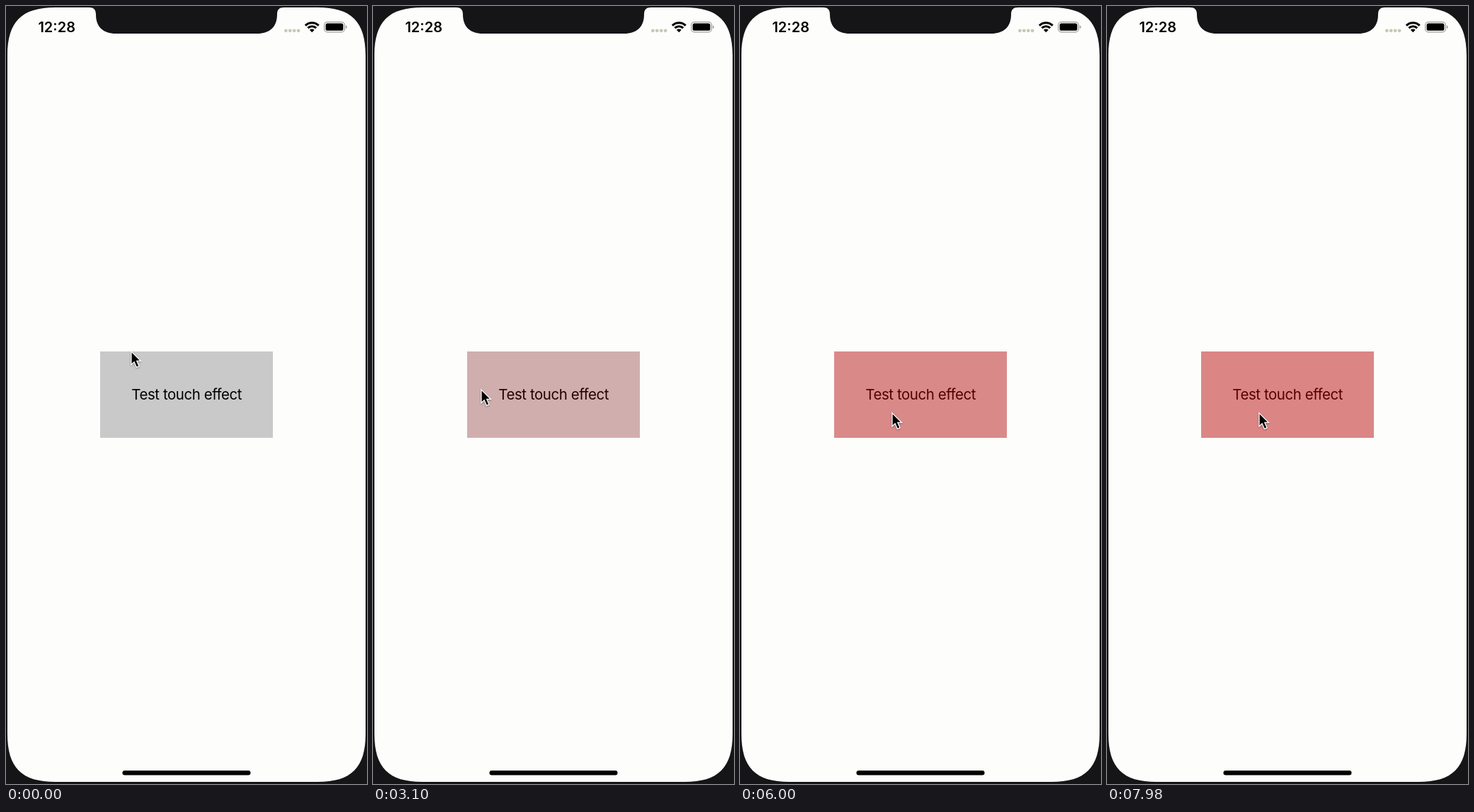
An HTML page that plays this animation: 510 by 1099 pixels, repeating every 8000 ms.

```html
<!DOCTYPE html>
<html lang="en">
<head>
<meta charset="utf-8">
<title>Touch effect</title>
<style>
  html, body { margin: 0; width: 100%; height: 100%; overflow: hidden; background: #151518; }
  svg { display: block; width: 100vw; height: 100vh; }
  text { font-family: Inter, "Liberation Sans", sans-serif; text-anchor: middle; }
  .clock { font-size: 20px; font-weight: 600; }
  .label { font-size: 20.4px; letter-spacing: -.4px; }
  .tint { fill: #f00; animation: tint 8s linear infinite; }
  .cursor { animation: move 8s ease-in-out infinite; filter: drop-shadow(0 1.5px 1.2px rgba(0, 0, 0, .35)); }

  @keyframes tint {
    0%, 34%     { opacity: 0; }
    38.75%      { opacity: .135; }
    46%         { opacity: .32; }
    54.5%       { opacity: .29; }
    68.5%       { opacity: .34; }
    82.25%      { opacity: .29; }
    99.75%, to  { opacity: .34; }
  }
  @keyframes move {
    0%             { transform: translate(176px, 486px); }
    15.5%          { transform: translate(127px, 532px); }
    31%, 38.75%    { transform: translate(152px, 540px); }
    50%, 54.5%     { transform: translate(163px, 573px); }
    65%, to        { transform: translate(214px, 573px); }
  }
</style>
</head>
<body>
<svg viewBox="0 0 510 1099">
  <rect width="510" height="1099" fill="#151518"/>

  <!-- screen with notch -->
  <path fill="#fdfdfc" d="M2 70C2 22 22 2 70 2H117C124 2 127 5 127 12C127 30 138 39 155 39
    H355C372 39 383 30 383 12C383 5 386 2 393 2H440C488 2 508 22 508 70
    V1028C508 1076 488 1096 440 1096H70C22 1096 2 1076 2 1028Z"/>

  <!-- status bar -->
  <text class="clock" x="71.7" y="37">12:28</text>
  <g fill="#c9c8b4">
    <circle cx="395.4" cy="34.8" r="2.4"/>
    <circle cx="401.3" cy="34.8" r="2.4"/>
    <circle cx="407.2" cy="34.8" r="2.4"/>
    <circle cx="413.1" cy="34.8" r="2.4"/>
  </g>
  <g fill="none" stroke="#000" stroke-width="3">
    <path d="M422.9 27.6A13.3 13.3 0 0 1 441.7 27.6"/>
    <path d="M426.4 31.1A8.3 8.3 0 0 1 438.2 31.1"/>
  </g>
  <path d="M432.3 37.2L428.9 33.8A4.8 4.8 0 0 1 435.7 33.8Z"/>
  <rect x="449.6" y="22.6" width="28.8" height="14.2" rx="4.4" fill="none" stroke="#a0a0a0" stroke-width="1.2"/>
  <rect x="451.6" y="24.6" width="24.8" height="10.2" rx="2.6"/>
  <path fill="#a0a0a0" d="M479.8 27.2Q481.8 28 481.8 29.7T479.8 32.2Z"/>

  <!-- button -->
  <rect x="133" y="488" width="244" height="122" fill="#c9c9c9"/>
  <text class="label" x="255.2" y="556">Test touch effect</text>
  <rect class="tint" x="133" y="488" width="244" height="122"/>

  <rect x="164.5" y="1080" width="181" height="6.4" rx="3.2"/>

  <g class="cursor">
    <path d="M1.6 3.6V19.2L5.3 15.7L8.7 23.6L11.2 22.5L7.8 14.7H12.8Z"
      stroke="#fff" stroke-width="2.6" paint-order="stroke"/>
  </g>
</svg>
</body>
</html>
```
